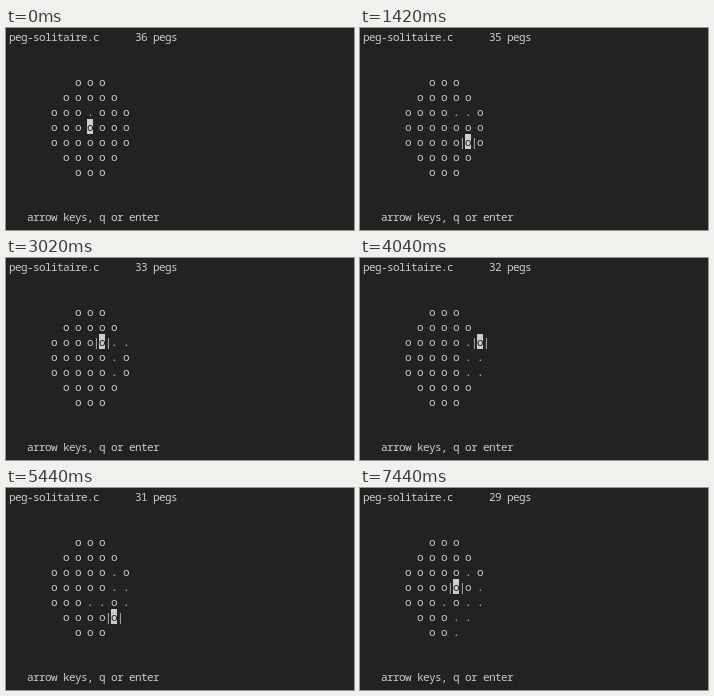
An HTML page that plays this animation: 348 by 202 pixels, repeating every 8 s.

```html
<!DOCTYPE html>
<html lang="en">
<head>
<meta charset="utf-8">
<title>Peg solitaire</title>
<style>
html, body { margin: 0; width: 100%; height: 100%; overflow: hidden; background: #222; }
svg { display: block; }
text { font: 11px "Noto Sans Mono", "DejaVu Sans Mono", monospace; white-space: pre; fill: #ccc; }
#cursor rect { fill: #ccc; }
#cursor text { fill: #222; }
</style>
</head>
<body>
<svg id="term" width="348" height="202" viewBox="0 0 348 202">
  <g id="lines"></g>
  <g id="cursor"><rect width="6" height="15"/><text y="12">o</text></g>
</svg>
<script>
const LOOP = 8000;
const CELL_W = 6, CELL_H = 15, LEFT = 3, TOP = 1, BASE = 12;
const BOARD_COL = 7, BOARD_ROW = 3, ROWS = 13;
const INSET = [2, 1, 0, 0, 0, 1, 2];

// pick time, jump time, row, column, row step, column step
const MOVES = [
  [400, 1000, 2, 5, 0, -1],
  [1420, 2020, 4, 5, -1, 0],
  [2420, 3020, 2, 6, 0, -1],
  [3440, 4040, 4, 6, -1, 0],
  [4440, 5040, 4, 3, 0, 1],
  [5440, 6040, 5, 5, -1, 0],
  [6440, 7040, 6, 4, -1, 0],
  [7440, Infinity, 3, 4, 0, 0]
];

const NS = "http://www.w3.org/2000/svg";
const cursor = document.getElementById("cursor");
const lines = Array.from({ length: ROWS }, (_, row) => {
  const el = document.createElementNS(NS, "text");
  el.setAttribute("y", TOP + row * CELL_H + BASE);
  el.setAttribute("x", Array.from({ length: 30 }, (_, i) => LEFT + i * CELL_W).join(" "));
  document.getElementById("lines").append(el);
  return el;
});

function stateAt(t) {
  const board = INSET.map(inset =>
    Array.from({ length: 7 }, (_, c) => c < inset || c > 6 - inset ? " " : "o"));
  board[2][3] = ".";
  const state = { board, row: 3, col: 3, picked: false, pegs: 36 };
  for (const [pick, jump, r, c, dr, dc] of MOVES) {
    if (t < pick) break;
    state.picked = true;
    state.row = r;
    state.col = c;
    if (t < jump) break;
    state.row += 2 * dr;
    state.col += 2 * dc;
    board[r][c] = board[r + dr][c + dc] = ".";
    board[state.row][state.col] = "o";
    state.pegs--;
  }
  return state;
}

function setLine(row, text) {
  if (lines[row].textContent !== text) lines[row].textContent = text;
}

function draw(t) {
  const { board, row, col, picked, pegs } = stateAt(t);
  setLine(0, "peg-solitaire.c".padEnd(21) + pegs + " pegs");
  board.forEach((holes, r) => {
    const chars = [...(" ".repeat(BOARD_COL) + holes.join(" ") + " ")];
    if (picked && r === row) {
      const at = BOARD_COL + 2 * col;
      chars[at - 1] = chars[at + 1] = "|";
    }
    setLine(BOARD_ROW + r, chars.join(""));
  });
  setLine(12, "   arrow keys, q or enter");
  const x = LEFT + (BOARD_COL + 2 * col) * CELL_W;
  const y = TOP + (BOARD_ROW + row) * CELL_H;
  cursor.setAttribute("transform", `translate(${x} ${y})`);
}

const start = performance.now();
function tick() {
  draw((performance.now() - start) % LOOP);
  requestAnimationFrame(tick);
}
tick();
</script>
</body>
</html>
```
